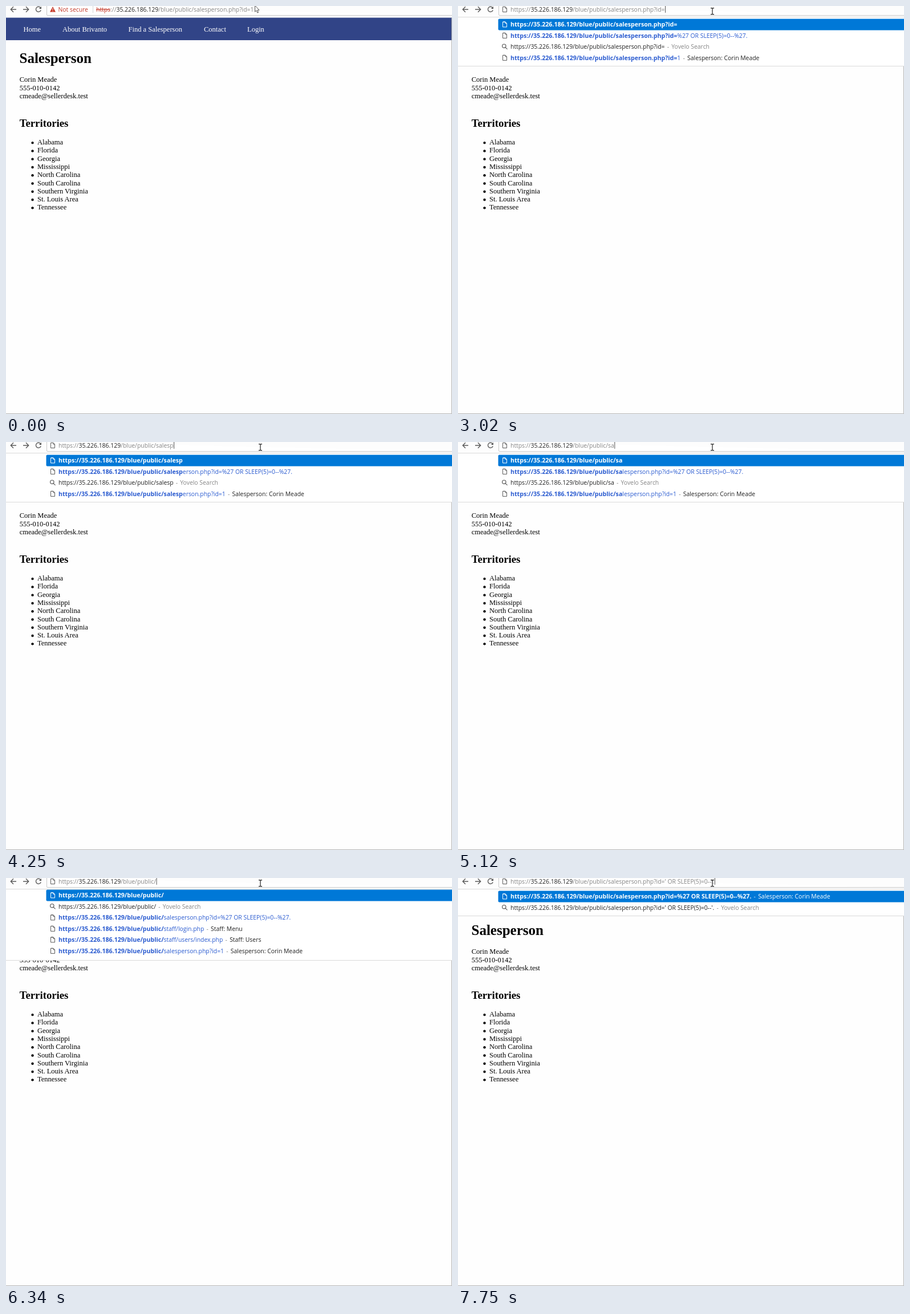
An HTML page that plays this animation: 782x716 px, repeating every 8 s.

```html
<!DOCTYPE html>
<html lang="en">
<head>
<meta charset="utf-8">
<title>Salesperson</title>
<style>
  html, body { margin: 0; width: 100%; height: 100%; overflow: hidden; background: #fefefe; }
  svg { display: block; width: 782px; height: 716px; }
  text { white-space: pre; }
  .page { font: 12.5px "Liberation Serif", serif; fill: #000; }
  .page .h1 { font-size: 25px; font-weight: bold; }
  .page .h2 { font-size: 18.75px; font-weight: bold; }
  .nav { fill: #fff; }
  .ui { font: 10.4px "Open Sans", "Noto Sans", sans-serif; fill: #222; }
  .ui .bold { font-size: 10.63px; font-weight: bold; }
  .dash { word-spacing: 1.5px; }
  .dim { fill: #858585; }
  .red { fill: #c53929; }
  .link { fill: #2a5bd0; }
  .white { fill: #fff; }
  .pale { fill: #d6e9fa; }
  .icon { fill: none; stroke: #5a5a5a; }
  .white-icon { stroke: #fff; }
</style>
</head>
<body>
<svg viewBox="0 0 782 716">
  <defs>
    <path id="file" d="M-3-4.5H1L3.5-2V4.5H-3.5V-4.5H1V-2H3.5" fill="none"/>
    <path id="lens" d="M1.4 1.4 4.5 4.5M2-1.2A3.2 3.2 0 1 1-4.4-1.2 3.2 3.2 0 0 1 2-1.2Z" fill="none" stroke-width="1.2"/>
  </defs>

  <g class="page">
    <rect width="782" height="716" fill="#fefefe"/>
    <rect y="20.5" width="781" height="39.5" fill="#314487"/>
    <g class="nav">
      <text x="30.5" y="45">Home</text>
      <text x="99" y="45">About Brivanto</text>
      <text x="214.5" y="45">Find a Salesperson</text>
      <text x="347" y="45">Contact</text>
      <text x="423" y="45">Login</text>
    </g>
    <text class="h1" x="23.5" y="99.5">Salesperson</text>
    <text x="23.7" y="133.3">Corin Meade</text>
    <text x="23.7" y="147.6">555-010-0142</text>
    <text x="23.7" y="162">cmeade@sellerdesk.test</text>
    <text class="h2" x="23.7" y="211.7">Territories</text>
    <g id="territories"></g>
    <path d="M781.5 20V715.5H0" fill="none" stroke="#b4b4b4"/>
  </g>

  <g class="ui">
    <rect width="782" height="20" fill="#fdfdfd"/>
    <path d="M782 16.5H73Q71.5 16.5 71.5 15V0" fill="#fff" stroke="#c8c8c8"/>
    <g class="icon" stroke-width="1.4">
      <path d="M18 6H8.5M13 1.2 8.3 6 13 10.8"/>
      <path d="M30 6H39.5M35 1.2 39.7 6 35 10.8"/>
      <path d="M60.4 2.8A4.5 4.5 0 1 0 61.2 7.3"/>
      <path d="M62 .8V5H57.8Z" fill="#5a5a5a" stroke="none"/>
    </g>
    <g id="idle">
      <path d="M82 1 87 10.5H77Z" fill="#c53929"/>
      <path d="M82 4V7.2M82 8.2V9.4" stroke="#fff"/>
      <text class="red" x="91.5" y="9.6">Not secure</text>
      <path d="M152.5 0V12" stroke="#d5d5d5"/>
      <text class="dim" x="158" y="9.6"><tspan class="red">https</tspan>://<tspan fill="#222">35.226.186.129</tspan>/blue/public/salesperson.php?id=1</text>
      <path d="M158 6.5H183" stroke="#c53929"/>
    </g>
    <g id="editing">
      <use href="#file" x="82" y="6" class="icon"/>
      <text id="address" class="dim" x="92" y="9.6"></text>
      <g id="list"></g>
    </g>
    <path id="caret" d="M.5 0V11.8" stroke="#555"/>
    <path id="arrow" d="M436.5-1V10.2L439 7.8 440.8 12 442.6 11.2 440.8 7.2H444Z" fill="#fff" stroke="#444" stroke-width=".9"/>
    <path id="beam" d="M-3-5.5H-1Q0-5.5 0-4.5Q0-5.5 1-5.5H3M0-4.5V4.5M-3 5.5H-1Q0 5.5 0 4.5Q0 5.5 1 5.5H3" fill="none" stroke="#222" stroke-width="1.2"/>
  </g>
</svg>

<script>
const $ = id => document.getElementById(id);
const LOOP = 8000, ROW = 19.5;
const HOST = '35.226.186.129', BASE = `https://${HOST}/blue/public/`;
const INJECTED = 'salesperson.php?id=%27 OR SLEEP(5)=0--%27.';
const PERSON = 'Salesperson: Corin Meade';

$('territories').innerHTML = ['Alabama', 'Florida', 'Georgia', 'Mississippi', 'North Carolina',
  'South Carolina', 'Southern Virginia', 'St. Louis Area', 'Tennessee'].map((name, i) => {
  const y = 243.1 + i * 14.28;
  return `<circle cx="46.5" cy="${y - 3}" r="2.2"/><text x="55" y="${y}">${name}</text>`;
}).join('');

// [time, typed path, path the list answers to, list lift, bottom edge lift]
const PASTED = "salesperson.php?id=' OR SLEEP(5)=0--'.";
const edits = [
  [1910, 'salesperson.php?id='],
  [3430, 'salesperson.php?id'],
  [4010, 'salesperson.ph'],
  [4130, 'salesperso'],
  [4250, 'salesp'],
  [4530, 'sales'],
  [4810, 'sale'],
  [4970, 'sal'],
  [5120, 'sa'],
  [5800, 's', 'sa'],
  [5940, 's'],
  [6340, '', '', 2, 0],
  [6500, '', '', 2],
  [6770, PASTED, PASTED, 2],
  [7210, PASTED]
];
const caretFlips = [270, 800, 1230, 1770, 1910, 2470, 3020, 5670, 5800, 7210, 7750];
const beamPath = [[540, 440, 6], [670, 444, 8], [800, 446, 9.2]];

const span = (cls, text) => `<tspan class="${cls}">${text}</tspan>`;
const titled = (title, dash, cls) => title ? span(`dash ${dash}`, ' - ') + span(cls, title) : '';

const selected = (path, title) =>
  ['file', span('white bold', BASE + path) + titled(title, 'pale', 'white')];

const search = query =>
  ['lens', BASE + query + titled('Yovelo Search', 'dim', 'dim')];

function history(query, path, title, everywhere) {
  let rest = path.slice(query.length);
  if (everywhere) rest = rest.replace(/s/gi, span('bold', '$&'));
  return ['file', span('link bold', BASE + query) + span('link', rest) + titled(title, 'dim', '')];
}

function suggestions(query) {
  if (query === PASTED) return [selected(INJECTED, PERSON), search(query)];
  const injected = history(query, INJECTED, '', query === 's');
  const person = history(query, 'salesperson.php?id=1', PERSON);
  if (query.length > 1) return [selected(query), injected, search(query), person];
  return [
    selected(query), search(query), injected,
    history(query, 'staff/login.php', 'Staff: Menu'),
    history(query, 'staff/users/index.php', 'Staff: Users'),
    person
  ];
}

function showEdit([, typed, query = typed, lift = 0, edgeLift = lift]) {
  $('address').innerHTML = `https://<tspan fill="#222">${HOST}</tspan>/blue/public/${typed}`;
  const rows = suggestions(query);
  const bottom = 27.5 + ROW * rows.length - edgeLift;
  $('list').innerHTML =
    `<rect y="19" width="782" height="${bottom - 19}" fill="#fff"/>
     <path d="M0 19.5H782M0 ${bottom}H782" stroke="#dadada"/>
     <path d="M782 ${22.5 - lift}H72.5q-2 0-2 2v16q0 2 2 2H782Z" fill="#0078d7"/>` +
    rows.map(([icon, text], i) => {
      const y = 32.4 + i * ROW - lift;
      return `<use href="#${icon}" x="82" y="${y}" class="icon ${i ? '' : 'white-icon'}"/>
        <text x="92" y="${y + 3.6}">${text}</text>`;
    }).join('');
}

const latest = (steps, t) => steps.filter(step => step[0] <= t).pop();
const show = (id, on) => { $(id).style.display = on ? '' : 'none'; };
let current, start;

function draw(t) {
  const edit = latest(edits, t), beam = latest(beamPath, t);
  show('idle', !edit);
  show('editing', edit);
  if (edit && edit !== current) showEdit(edit);
  current = edit;

  const caretX = edit ? 92.5 + $('address').getComputedTextLength() : 435;
  $('caret').setAttribute('transform', `translate(${caretX})`);
  show('caret', caretFlips.filter(at => at <= t).length % 2);

  show('arrow', !beam);
  show('beam', beam);
  if (beam) $('beam').setAttribute('transform', `translate(${beam[1]} ${beam[2]})`);
}

function tick(now) {
  start ??= now;
  draw((now - start) % LOOP);
  requestAnimationFrame(tick);
}
draw(0);
requestAnimationFrame(tick);
</script>
</body>
</html>
```
